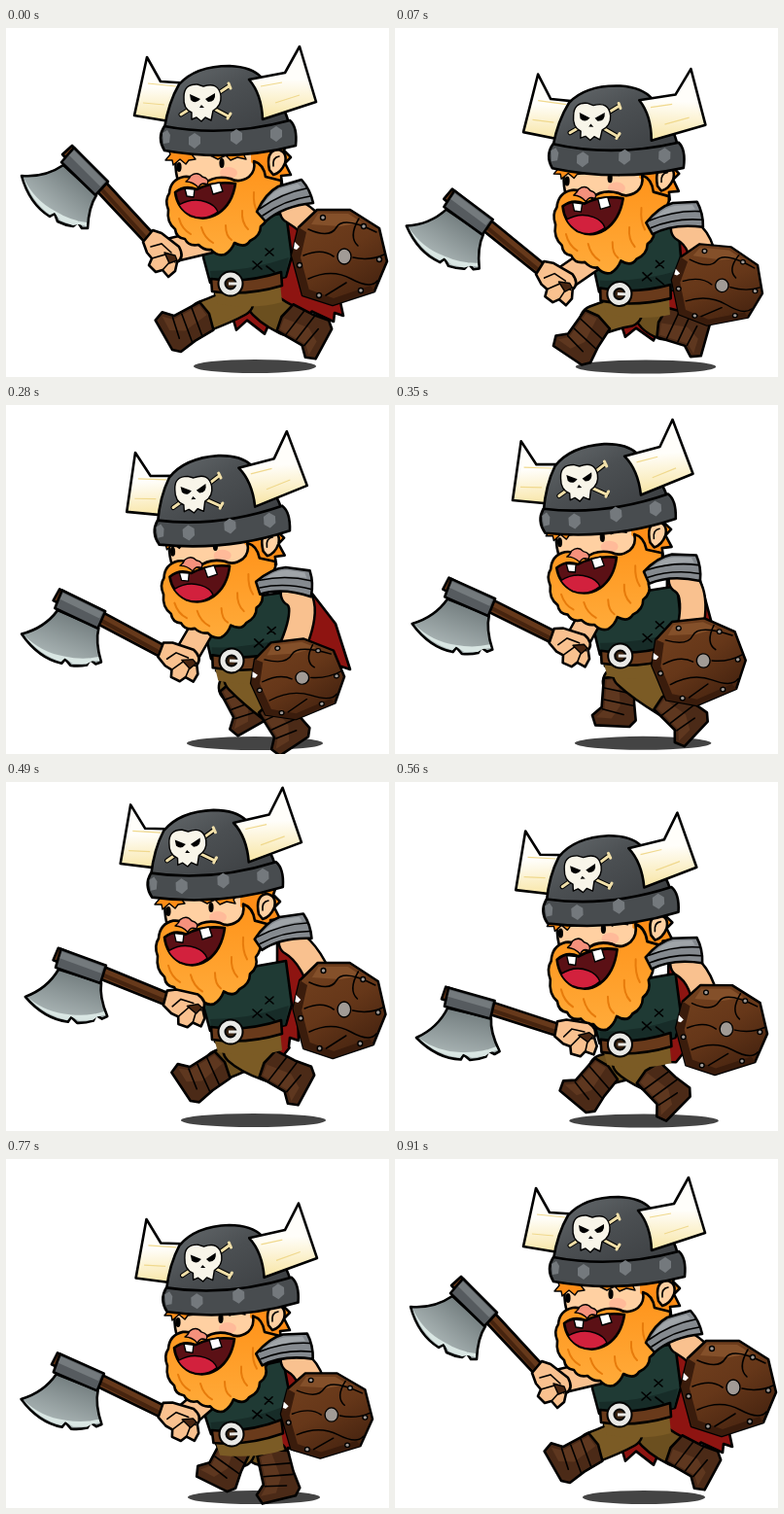
Write an HTML page that moves like this. It is 394 px wide and 359 px high and loops after 0.98 s.

```html
<!DOCTYPE html>
<html lang="en">
<head>
<meta charset="utf-8">
<title>Running viking</title>
<style>
html, body { margin: 0; width: 100%; height: 100%; overflow: hidden; background: #fff; }
svg { display: block; width: 394px; height: 359px; }
.o { stroke: #000; stroke-width: 2.6; stroke-linejoin: round; stroke-linecap: round; }
.t { stroke: #000; stroke-width: 1.4; stroke-linejoin: round; stroke-linecap: round; }
.l { fill: none; stroke: #000; stroke-width: 1.6; stroke-linecap: round; }
.limb { fill: none; stroke-linecap: round; stroke-linejoin: round; }
</style>
</head>
<body>
<svg viewBox="0 0 394 359">
  <defs>
    <linearGradient id="steel" x1="0" y1="0" x2="1" y2="1">
      <stop offset="0" stop-color="#666b6e"/><stop offset=".45" stop-color="#4b4f52"/><stop offset="1" stop-color="#3b3e41"/>
    </linearGradient>
    <linearGradient id="horn" x1="0" y1="0" x2="0" y2="1">
      <stop offset=".45" stop-color="#fffefa"/><stop offset="1" stop-color="#f8e5a4"/>
    </linearGradient>
    <linearGradient id="blade" x1="0" y1="1" x2="1" y2="0">
      <stop offset=".2" stop-color="#b4bfbf"/><stop offset="1" stop-color="#5d6769"/>
    </linearGradient>
    <linearGradient id="wood" x1="0" y1="0" x2=".6" y2="1">
      <stop offset="0" stop-color="#74421f"/><stop offset=".55" stop-color="#663719"/><stop offset="1" stop-color="#472410"/>
    </linearGradient>
    <linearGradient id="fur" x1="0" y1="0" x2="0" y2="1">
      <stop offset="0" stop-color="#ff931a"/><stop offset="1" stop-color="#ffab3a"/>
    </linearGradient>
    <g id="boot">
      <path class="o" fill="#4b2a17" d="M-15 -23 L0 -26 17 -22 18 0 21 18 15 25 -20 26 -24 16 -15 7Z"/>
      <path fill="#5e371f" d="M-12 -21 L0 -23 4 4 -4 18 -20 18 -12 9Z"/>
      <path class="l" d="M-14 -13 L16 -9 M-13 -1 L17 3 M-14 9 L8 13"/>
    </g>
  </defs>

  <ellipse id="shadow" ry="7" fill="#444"/>
  <path id="tail" class="o" fill="#8e1411"/>
  <path id="cape" class="o" fill="#8e1411"/>
  <path id="legB1" class="limb" stroke="#000" stroke-width="34"/>
  <path id="legB2" class="limb" stroke="#6b4f1f" stroke-width="29"/>
  <use id="bootB" href="#boot"/>
  <path id="legA1" class="limb" stroke="#000" stroke-width="34"/>
  <path id="legA2" class="limb" stroke="#7b5b25" stroke-width="29"/>
  <use id="bootA" href="#boot"/>

  <g id="torso">
    <path fill="#7b5b25" d="M213 266 L282 262 284 282 Q255 290 218 284Z"/>
    <path class="o" fill="#1f3a34" d="M203 205 L288 190 294 235 288 256 Q250 266 210 262 L203 236Z"/>
    <path fill="#172c28" d="M210 250 Q250 250 291 236 L287 256 Q250 264 211 260Z"/>
    <path class="l" stroke-width="1" d="M254 240 l9 8 m0 -8 l-9 8 M267 227 l8 7 m0 -7 l-8 7 M268 245 l8 6"/>
    <path class="o" fill="#693a1b" d="M211 258 Q247 263 283 251 L284 265 Q247 276 212 271Z"/>
    <circle cx="231" cy="263" r="9" fill="#3a2412" stroke="#000" stroke-width="9"/>
    <circle cx="231" cy="263" r="9" fill="none" stroke="#e9e9e6" stroke-width="5"/>
    <path d="M229 263 H242" stroke="#e9e9e6" stroke-width="3"/>
  </g>

  <path id="armL1" class="limb" stroke="#000" stroke-width="27"/>
  <path id="armL2" class="limb" stroke="#f9c18f" stroke-width="22"/>

  <g id="face">
    <path class="o" fill="#ff8d17" d="M255 118 L288 120 286 126 293 133 287 139 293 151 283 152 284 160 270 164 255 158Z"/>
    <path class="o" fill="#ffd0a2" d="M176 122 L262 118 266 150 Q250 172 182 167 Q171 152 176 122Z"/>
    <path fill="#ff8d17" d="M252 120 H270 L268 158 H256 Q261 145 252 138Z"/>
    <path class="o" fill="#ffd0a2" d="M271 146 Q267 127 279 125 Q290 127 287 139 Q283 149 275 151Z"/>
    <path class="l" d="M275 142 Q274 133 281 132"/>
    <ellipse cx="229" cy="149" rx="9" ry="6" fill="#ffb096" opacity=".7"/>
    <ellipse cx="178" cy="143" rx="2.6" ry="5"/>
    <ellipse cx="222" cy="139" rx="2.6" ry="5"/>
    <path class="t" fill="#ff8d17" d="M164 136 L169 130 167 125 Q174 120 181 124 L190 123 191 130 195 135 188 136 185 140 179 135 172 141 171 136Z"/>
    <path class="t" fill="#ff8d17" d="M210 131 L215 127 215 122 Q222 119 228 122 L238 119 240 124 249 126 245 131 247 135 238 133 231 136 226 131 218 135Z"/>
  </g>

  <g id="beard">
    <path class="o" fill="url(#fur)" d="M183 153 Q169 156 168 170 Q163 177 167 187 Q165 200 174 207 Q175 216 184 217 Q188 225 198 223 Q204 229 211 228 Q217 235 225 233 Q232 229 235 221 Q246 227 251 219 Q262 214 262 204 Q271 198 268 188 Q274 181 273 173 Q285 167 283 157 L267 153 Q265 140 255 137 Q257 147 250 153 Q240 160 231 155 Q215 151 204 160 Q194 152 183 153Z"/>
    <path fill="none" stroke="#e77b0b" stroke-width="2" stroke-linecap="round" d="M178 196 Q181 207 190 212 M201 205 Q204 216 213 221 M226 203 Q226 214 232 218 M243 188 Q242 200 249 207 M255 169 Q254 182 259 190"/>
    <path class="o" fill="#5b1015" d="M174 169 Q184 161 196 166 Q214 157 236 160 Q233 181 218 191 Q205 199 190 193 Q176 185 174 169Z"/>
    <path class="t" fill="#d2213d" d="M178 182 Q192 174 206 179 Q215 182 218 189 Q205 199 190 193 Q182 189 178 182Z"/>
    <path class="t" fill="#fff" d="M184 165 L194 166 193 174 186 173Z M210 161 L220 159 223 168 213 171Z"/>
    <path class="t" fill="#f5917c" d="M185 158 Q189 155 190 152 Q197 147 202 153 Q210 155 207 161 Q201 158 198 164 Q192 158 185 158Z"/>
  </g>

  <g id="helmet">
    <path class="o" fill="url(#horn)" d="M145 30 L159 55 190 57 174 97 132 90Z"/>
    <path class="o" fill="url(#steel)" d="M163 103 Q167 77 178 58 Q195 39 230 39 Q253 40 263 51 Q284 72 291 98 Q230 112 163 103Z"/>
    <path class="o" fill="url(#horn)" d="M302 19 L287 46 250 53 Q263 68 264 94 L319 76Z"/>
    <path fill="none" stroke="#f0d98e" stroke-width="1.2" d="M146 57 L175 60 M141 77 L163 79 M262 60 L284 56 M277 77 L302 69"/>
    <path class="o" fill="#484c4f" d="M163 101 Q225 113 292 95 Q300 102 298 121 Q232 138 163 126 Q155 113 163 101Z"/>
    <path fill="#74797d" d="M188 112 l6 -4 6 4 v7 l-6 5 -6 -4Z M231 108 l6 -4 6 4 v7 l-6 5 -6 -4Z M272 105 l6 -4 6 4 v7 l-6 5 -6 -4Z M161 108 l5 -3 3 5 -1 8 -6 1Z"/>
    <path d="M180 89 L188 84 M217 68 L229 60 M214 83 L229 91" stroke="#000" stroke-width="5" stroke-linecap="round"/>
    <path d="M180 89 L188 84 M217 68 L229 60 M214 83 L229 91 M229 57 l2 5 M231 88 l-3 5" stroke="#f0dfa9" stroke-width="3" stroke-linecap="round"/>
    <path class="t" fill="#f8f5e9" d="M183 71 Q183 57 197 58 L203 60 Q219 55 221 70 Q222 80 213 85 L211 95 205 92 201 96 196 92 191 94 191 87 Q182 83 183 71Z"/>
    <path d="M189 68 L200 73 Q195 79 190 74Z M205 73 L215 67 Q216 76 208 76Z M201 79 l3 3 -5 0Z"/>
  </g>

  <g id="axe">
    <path class="o" fill="#66391b" d="M68 121 L175 237 165 244 58 130Z"/>
    <path d="M72 137 L164 238" stroke="#46240f" stroke-width="4"/>
    <path class="o" fill="url(#blade)" d="M59 141 Q40 154 16 152 Q24 181 45 194 L50 191 53 199 Q61 203 69 204 L74 200 78 206 84 206 Q85 184 93 172Z"/>
    <path fill="#d9e6e3" d="M18 154 Q29 177 50 188 Q66 198 83 200 L83 204 75 202 69 203 56 198 50 190 45 192 Q26 178 18 154Z"/>
    <path class="o" fill="#565b5f" d="M70 123 L105 158 92 172 57 138Z"/>
    <path fill="#747a7d" d="M70 126 L102 158 97 163 65 131Z"/>
    <path class="o" fill="#f9c18f" d="M141 220 L151 208 160 211 178 225 Q184 236 176 241 L174 250 167 256 161 249 154 251 147 244 150 237 145 231Z"/>
    <path class="l" stroke-width="2.2" d="M150 237 L164 233 174 241 M161 249 L169 240 M149 225 L160 222 170 231"/>
    <path fill="#4a2712" class="t" d="M163 231 L174 234 176 239 168 242Z"/>
  </g>

  <path id="armR1" class="limb" stroke="#000" stroke-width="29"/>
  <path id="armR2" class="limb" stroke="#f9c18f" stroke-width="24"/>
  <g id="plate">
    <path class="o" fill="#858a8f" d="M258 189 Q267 170 280 163 L304 156 Q313 166 316 180 Q285 183 267 199Z"/>
    <path fill="#a0a5a9" d="M264 184 Q271 170 283 165 L300 160 304 164 Q283 169 264 184Z"/>
    <path class="l" stroke-width="2" d="M261 186 Q283 170 309 165 M264 193 Q286 177 313 173"/>
  </g>
  <g id="shield">
    <path class="o" stroke-width="3" fill="url(#wood)" d="M320 187 L354 187 384 206 392 240 379 271 336 285 305 275 294 234 301 205Z"/>
    <path fill="#3a1c0c" d="M294 234 L301 205 309 210 303 236 312 270 305 275Z M305 275 L312 269 337 278 375 265 379 271 336 285Z"/>
    <path fill="#84502a" d="M321 191 L352 191 366 200 344 204 314 202Z"/>
    <path class="l" stroke="#2c1408" d="M311 207 Q333 217 340 205 T381 210 M306 234 Q325 226 337 235 M357 236 Q374 240 389 233 M311 258 Q335 247 355 258 T382 260 M329 275 L350 262 M363 196 Q352 215 362 224"/>
    <path fill="#fff" d="M297 220 l5 5 -3 3 -3 -1Z"/>
    <g class="t" fill="#a19b96" stroke-width="1">
      <ellipse cx="348" cy="235" rx="7" ry="8"/>
      <circle cx="326" cy="195" r="2.5"/><circle cx="368" cy="204" r="2.5"/><circle cx="384" cy="238" r="2.5"/>
      <circle cx="365" cy="270" r="2.5"/><circle cx="322" cy="275" r="2.5"/><circle cx="302" cy="244" r="2.5"/>
    </g>
  </g>
</svg>
<script>
const STEP = 70, STEPS = 14;
const at = [0, 2, 4, 7, 9, 11, 13];   // steps of the key poses; the last repeats the first

// Key poses: x, y, angle, scale x, scale y
const keys = {
  helmet: [[202,75,0], [202,115,3], [193,90,-4], [187,66,-2.4], [201,121,-3.4], [203,105,-2]],
  face: [[196,157,0], [193,187,2], [190,164,-2], [185,147,0], [193,193,-1], [195,182,0]],
  beard: [[196,157,0,1,1], [193,186,2,1,1.1], [190,164,-2,1,1], [185,147,0,1,1.07], [193,193,-1,1,1.16], [195,182,0,1,1.02]],
  axe: [[50,179,0], [50,279,-18.8], [57,250,-19], [62,231,-25], [66,307,-31.5], [57,260,-21]],
  shield: [[343,236,0,1,1], [316,297,9,.92,.68], [300,282,-7,.98,.83], [343,235,0,.97,1], [325,279,0,.95,.86], [330,264,0,.96,.89]],
  plate: [[288,178,0], [292,214,28], [289,184,24], [287,155,8], [292,203,22], [289,197,14]],
  torso: [[231,263,0], [231,284,5], [232,263,2], [231,257,0], [232,284,0], [232,283,-3]],
  bootA: [[186,306,62], [216,330,0], [285,328,-32], [288,302,-60], [258,331,-18], [226,313,28]],
  bootB: [[306,310,-60], [278,312,-75], [244,308,-28], [203,302,58], [213,322,12], [278,325,-12]],
  cape: [[335,240,342,302], [342,252,330,285], [339,225,349,278], [300,230,296,272], [329,240,320,270], [318,235,294,306]],
  tail: [[40], [28], [10], [8], [10], [18]],
  shadow: [[256,348,63], [259.5,349,81], [256,348,70], [254.5,348,74.5], [257.5,349,77.5], [255,348,68]]
};
const anchors = {
  helmet: [202,75], face: [196,157], beard: [196,157], axe: [50,179], shield: [343,236],
  plate: [288,178], torso: [231,263], bootA: [0,0], bootB: [0,0]
};

const $ = id => document.getElementById(id);

// Smooth cyclic curve through the key poses
function sample(list, s) {
  const pts = [...list, list[0]], n = pts.length;
  let i = 0;
  while (i < n - 2 && s >= at[i + 1]) i++;
  const t0 = at[i], t1 = at[i + 1], h = t1 - t0, u = (s - t0) / h;
  const before = i ? at[i - 1] : -3, prev = i ? pts[i - 1] : pts[n - 2];
  const after = i < n - 2 ? at[i + 2] : 16, next = i < n - 2 ? pts[i + 2] : pts[1];
  return pts[i].map((a, k) => {
    const b = pts[i + 1][k];
    const m0 = (b - prev[k]) / (t1 - before) * h;
    const m1 = (next[k] - a) / (after - t0) * h;
    const v = u * u, w = v * u;
    return (2*w - 3*v + 1) * a + (w - 2*v + u) * m0 + (3*v - 2*w) * b + (w - v) * m1;
  });
}

function place(id, [x, y, r, sx = 1, sy = 1]) {
  const [ax, ay] = anchors[id];
  $(id).setAttribute("transform", `translate(${x} ${y}) rotate(${r}) scale(${sx} ${sy}) translate(${-ax} ${-ay})`);
}

function spin([x, y, r], dx, dy) {
  const a = r * Math.PI / 180, c = Math.cos(a), s = Math.sin(a);
  return [x + dx * c - dy * s, y + dx * s + dy * c];
}

function limb(id, ...pts) {
  const d = pts.length > 2 ? `M${pts[0]} Q${pts[1]} ${pts[2]}` : `M${pts[0]} L${pts[1]}`;
  $(id + 1).setAttribute("d", d);
  $(id + 2).setAttribute("d", d);
}

function leg(side, boot, hip) {
  const top = spin(boot, 0, -20), knee = spin(boot, -2, -32);
  limb("leg" + side, hip, [(hip[0] + knee[0]) / 2, (hip[1] + knee[1]) / 2 + 3], top);
}

function draw(s) {
  const p = {};
  for (const id in keys) p[id] = sample(keys[id], s);
  for (const id in anchors) place(id, p[id]);

  const sh = $("shadow");
  sh.setAttribute("cx", p.shadow[0]);
  sh.setAttribute("cy", p.shadow[1]);
  sh.setAttribute("rx", p.shadow[2]);

  const [tx, ty] = p.torso;
  leg("A", p.bootA, [tx + 8, ty + 18]);
  leg("B", p.bootB, [tx + 30, ty + 16]);

  const [px, py] = p.plate, [sx, sy] = p.shield;
  limb("armR", [px + 7, py + 10], [px + 28, py + 22], [sx - 14, sy - 14]);
  limb("armL", spin(p.axe, 118, 50), [p.face[0] + 14, p.face[1] + 62]);

  const [rx, ry, bx, by] = p.cape, hx = tx + 48, hy = ty + 18;
  const mx = (bx + hx) / 2, my = (by + hy) / 2;
  $("cape").setAttribute("d", `M${px - 8} ${py} L${px + 26} ${py + 10} ${rx} ${ry} ${bx + 5} ${by - 6} ${bx - 4} ${by - 9} ${bx - 5} ${by} ${mx + 4} ${my} ${mx - 4} ${my + 10} ${hx} ${hy}Z`);

  const k = p.tail[0], y = ty + 10;
  $("tail").setAttribute("d", `M${tx - 16} ${y} l7 ${k * .72} 10 ${-k * .2} 5 ${k * .42} 11 ${-k * .25} 18 ${k * .35} 8 ${-k * .45} 10 ${k * .2} 2 ${-k * .79}Z`);
}

function tick() {
  draw(Math.floor(performance.now() / STEP) % STEPS);
  requestAnimationFrame(tick);
}
tick();
</script>
</body>
</html>
```
